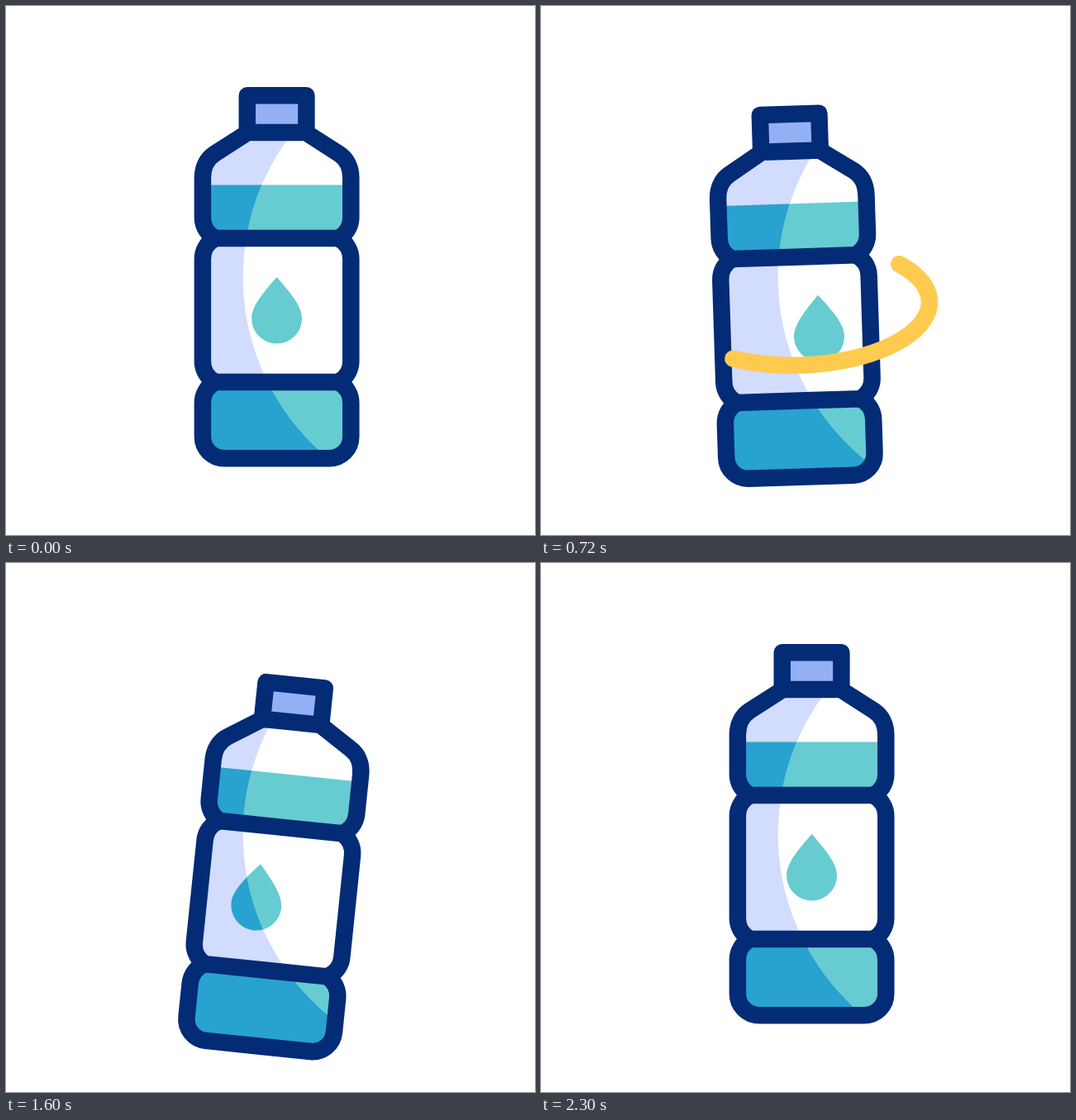
Write an HTML page with a canvas that moves like this. It is 640 by 640 pixels and loops after 2.4 s.

```html
<!DOCTYPE html>
<html lang="en">
<head>
<meta charset="utf-8">
<title>Shaking bottle</title>
<style>
  html, body { margin: 0; width: 100%; height: 100%; overflow: hidden; background: #fff; }
  canvas { display: block; }
</style>
</head>
<body>
<canvas id="stage" width="640" height="640"></canvas>
<script>
const ctx = document.getElementById('stage').getContext('2d');
const LOOP = 2400, MID_X = 327.6, MID_Y = 327.8, LABEL_TURN = 230;
const NAVY = '#032b76', TEAL = '#66ccd1', BLUE = '#28a2ce',
      SHADE = '#d2dcfe', CAP = '#94b0f4', YELLOW = '#fecb4e';

// Turning points of the shake; windUp delays the first move
const POSES = [
  { at: 100, tilt: 0, y: 0, windUp: 1.28 },
  { at: 600, tilt: 18, y: 45.8 },
  { at: 840, tilt: -21.2, y: 0 },
  { at: 1600, tilt: 5.9, y: 38.4 },
  { at: 2000, tilt: -3.9, y: 0 },
  { at: 2300, tilt: 0, y: 0 }
];

const mix = (a, b, k) => a + (b - a) * k;
const ramp = (t, from, to) => Math.min(1, Math.max(0, (t - from) / (to - from)));
const smooth = k => k * k * (3 - 2 * k);
const easeOut = k => k * (2 - k);

function pose(t) {
  const i = Math.max(1, POSES.findIndex(p => p.at > t));
  const [a, b] = t < LOOP - 100 ? [POSES[i - 1], POSES[i]] : POSES.slice(-2);
  const k = smooth(ramp(t, a.at, b.at) ** (a.windUp || 1));
  return {
    tilt: mix(a.tilt, b.tilt, k) * Math.PI / 180,
    x: -32 * Math.sin(Math.PI * ramp(t, 100, 900) ** 1.35) ** 2,
    y: mix(a.y, b.y, k)
  };
}

// The label creeps, then spins once around the bottle
function labelShift(t) {
  const lead = 27;
  const turn = lead * smooth(ramp(t, 100, 540)) + (LABEL_TURN - lead) * easeOut(ramp(t, 720, 2000));
  return (turn + LABEL_TURN / 2) % LABEL_TURN - LABEL_TURN / 2;
}

// Bottle shapes have x measured from the axis; the outline is mirrored
const half = new Path2D('M0 153H-35L-75 178.7C-85 185-89.7 196-89.7 208V256' +
  'A28 28 0 0 0-74.3 281A28 28 0 0 0-89.7 306V430A28 28 0 0 0-74.3 455' +
  'A28 28 0 0 0-89.7 480V521A26 26 0 0 0-63.7 547.2H0M-74.3 281H0M-74.3 455H0');
const cap = new Path2D('M-35.8 108.2H35.8V153H-35.8Z');
const outline = new Path2D(cap);
outline.addPath(half);
outline.addPath(half, new DOMMatrix().scale(-1, 1));
const inside = new Path2D('M-35 153L-75 179L-85 200V547H85V200L75 179L35 153Z');
const drop = new Path2D('M0 328C-13 343-30.5 362-30.5 378A30.5 30.5 0 0 0 30.5 378C30.5 362 13 343 0 328Z');
const label = new Path2D('M-85 281H85V455H-85Z');
// Everything left of a big circle that stays still on the stage
const shadow = new Path2D('M0 0H900V640H0Z');
shadow.arc(571.7, 328, 285, 0, 2 * Math.PI);

function scoped(draw) {
  ctx.save();
  draw();
  ctx.restore();
}

function contents(t, back, water) {
  ctx.fillStyle = back;
  ctx.fill(inside);
  ctx.fillStyle = water;
  ctx.fillRect(-85, 216.5, 170, 64.5);
  ctx.fillRect(-85, 455, 170, 92);
  ctx.clip(label);
  ctx.translate(labelShift(t), 0);
  ctx.fill(drop);
}

function bottle(t) {
  const { tilt, x, y } = pose(t);
  const place = () => {
    ctx.translate(MID_X + x, MID_Y + y);
    ctx.rotate(tilt);
    ctx.translate(0, -MID_Y);
  };
  scoped(() => { place(); contents(t, '#fff', TEAL); });
  scoped(() => { ctx.clip(shadow, 'evenodd'); place(); contents(t, SHADE, BLUE); });
  scoped(() => {
    place();
    ctx.fillStyle = CAP;
    ctx.fill(cap);
    ctx.strokeStyle = NAVY;
    ctx.stroke(outline);
  });
}

const line = (x1, y1, x2, y2) => k => [mix(x1, x2, k), mix(y1, y2, k)];
const arc = (cx, cy, rx, ry, from, to, skew = 0) => k => {
  const a = mix(from, to, k) * Math.PI / 180;
  return [cx + rx * Math.cos(a), cy + ry * Math.sin(a + skew)];
};

const swoosh = arc(311.5, 361.7, 158.5, 73, 190, -40, -0.05);
const splashes = [
  line(198, 105, 174.5, 92.5),
  line(252, 76, 242.2, 44.3),
  arc(316, 75, 27.5, 27.5, 168, 320)
];

// Strokes the part of a curve between tail and head
function streak(curve, tail, head, color) {
  if (head <= tail) return;
  ctx.strokeStyle = color;
  ctx.beginPath();
  for (let i = 0; i <= 40; i++) ctx.lineTo(...curve(mix(tail, head, i / 40)));
  ctx.stroke();
}

function frame(now) {
  const t = now % LOOP;
  ctx.fillStyle = '#fff';
  ctx.fillRect(0, 0, 640, 640);
  ctx.lineWidth = 20.5;
  ctx.lineCap = ctx.lineJoin = 'round';
  bottle(t);
  streak(swoosh, smooth(ramp(t, 545, 1025)), smooth(ramp(t, 490, 725)), YELLOW);
  splashes.forEach((curve, i) => {
    const span = 140 + 35 * i, head = 860 + 20 * i, tail = 905 + 50 * i;
    streak(curve, ramp(t, tail, tail + span), ramp(t, head, head + span), TEAL);
  });
  requestAnimationFrame(frame);
}
requestAnimationFrame(frame);
</script>
</body>
</html>
```
